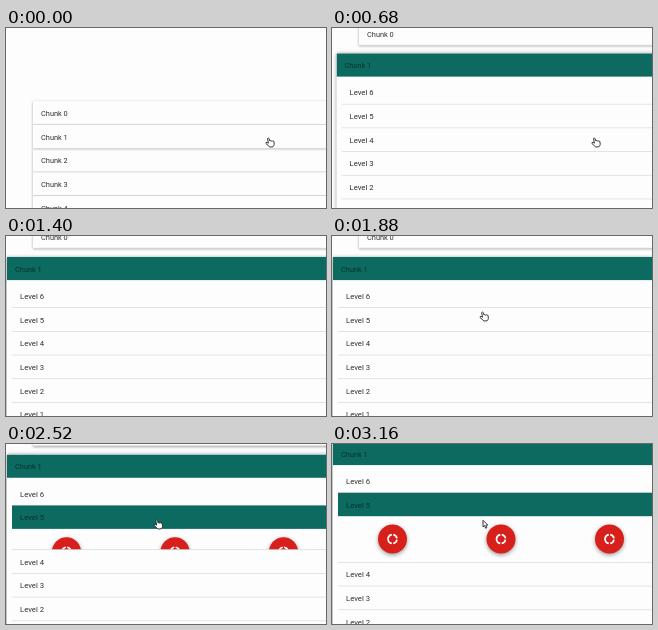
Write an HTML page with a canvas that moves like this. It is 320 px wide and 180 px high and loops after 3.2 s.

```html
<!DOCTYPE html>
<html lang="en">
<head>
<meta charset="utf-8">
<title>Expanding list</title>
<style>
html, body { margin: 0; width: 100%; height: 100%; overflow: hidden; background: #fdfdfd; }
canvas { display: block; width: 320px; height: 180px; }
</style>
</head>
<body>
<canvas id="stage"></canvas>
<script>
const LOOP = 3200, ROW = 23.7, PAPER = '#fdfdfd', TEAL = '#0c6a60', RED = '#d71f1b';
const canvas = document.getElementById('stage');
const ctx = canvas.getContext('2d');
const dpr = window.devicePixelRatio || 1;
canvas.width = 320 * dpr;
canvas.height = 180 * dpr;

const clamp = v => Math.max(0, Math.min(1, v));
const mix = (a, b, p) => a + (b - a) * p;

function bezier(x1, y1, x2, y2) {
  const at = (a, b, u) => 3 * a * u * (1 - u) ** 2 + 3 * b * u * u * (1 - u) + u ** 3;
  return x => {
    let lo = 0, hi = 1;
    for (let i = 0; i < 24; i++) {
      const mid = (lo + hi) / 2;
      if (at(x1, x2, mid) < x) lo = mid; else hi = mid;
    }
    return at(y1, y2, (lo + hi) / 2);
  };
}
const standard = bezier(0.4, 0, 0.2, 1);
const ease = bezier(0.25, 0.1, 0.25, 1);
const span = (t, start, length, curve) => curve(clamp((t - start) / length));

function rect(x, y, w, h, fill) {
  ctx.fillStyle = fill;
  ctx.fillRect(x, y, w, h);
}

function shadow(alpha, blur, dy) {
  ctx.shadowColor = `rgba(0,0,0,${alpha})`;
  ctx.shadowBlur = blur * dpr;
  ctx.shadowOffsetY = dy * dpr;
}

function card(x, y, h, alpha = 0.36, blur = 2.5) {
  ctx.save();
  shadow(alpha, blur, 0.8);
  rect(x, y, 360, h, PAPER);
  ctx.restore();
}

function label(text, x, y, size, color = '#303030') {
  ctx.font = `${size}px Roboto, sans-serif`;
  ctx.textBaseline = 'alphabetic';
  ctx.fillStyle = color;
  ctx.fillText(text, x, y + size * 0.355);
}

function chunk(i, y) {
  card(27, y, ROW);
  rect(27, y + ROW - 0.5, 293, 0.6, '#cfcfcf');
  label('Chunk ' + i, 35, y + 12.3, 7.4);
}

function ring(x, y) {
  ctx.strokeStyle = '#fff';
  ctx.lineWidth = 1.7;
  const gap = 0.16, q = Math.PI / 2;
  for (const [from, to] of [[-q, 0], [0, q], [q, 3 * q]]) {
    ctx.beginPath();
    ctx.arc(x, y, 4.5, from + gap, to - gap);
    ctx.stroke();
  }
}

function button(x, y) {
  ctx.save();
  shadow(0.4, 4, 1.5);
  ctx.fillStyle = RED;
  ctx.beginPath();
  ctx.arc(x, y, 14.5, 0, Math.PI * 2);
  ctx.fill();
  ctx.restore();
  ring(x, y);
}

function levels(x, top, drawer, active) {
  let y = top + 27.3;
  for (let n = 6; n >= 1; n--) {
    const on = n === 5 && active;
    if (on) rect(x + 5, y, 330, ROW - 0.3, TEAL);
    label('Level ' + n, x + 13, y + 12, 7.7, on ? '#08322e' : '#303030');
    y += ROW;
    if (n === 5 && drawer > 0) {
      ctx.save();
      ctx.beginPath();
      ctx.rect(0, y, 320, drawer);
      ctx.clip();
      for (const cx of [60.5, 169, 277.5]) button(cx, y + 22.5);
      ctx.restore();
      y += drawer;
    }
    if (n > 1 && !(on && drawer === 0)) rect(x + 5, y - 0.5, 330, 0.7, '#d9d9d9');
  }
}

function panel(x, top, body, teal, drawer, active) {
  const h = ROW + body;
  card(x, top, h, mix(0.36, 0.5, teal), mix(2.5, 4, teal));
  ctx.save();
  ctx.beginPath();
  ctx.rect(x, top, 360, h);
  ctx.clip();
  if (body > 0) levels(x, top, drawer, active);
  ctx.globalAlpha = teal;
  rect(x, top, 360, ROW - 0.4, TEAL);
  ctx.globalAlpha = 1;
  if (teal < 1) rect(x, top + ROW - 0.5, 360, 0.6, `rgba(207,207,207,${1 - teal})`);
  label('Chunk 1', x + 8, top + 12.2, 7.4, teal > 0.5 ? '#08322e' : '#303030');
  ctx.restore();
}

function outline(path, x, y) {
  ctx.save();
  ctx.translate(x, y);
  const shape = new Path2D(path);
  ctx.fillStyle = '#fff';
  ctx.strokeStyle = '#222';
  ctx.lineWidth = 0.9;
  ctx.lineJoin = 'round';
  ctx.fill(shape);
  ctx.stroke(shape);
  ctx.restore();
}

const HAND = 'M0 .6 Q.8 -.5 1.6 .6 L2.4 3 Q3.2 2.3 3.8 3 Q4.7 2.4 5.2 3.1 Q6.3 2.8 6.5 4 ' +
  'L6.7 6.4 Q6.4 8 5.4 8.8 L2.3 9 Q.8 7.6 -1.6 5.5 Q-1.8 4.1 -.4 4.4 L.9 5.2 Z';
const ARROW = 'M0 0 L0 6.6 L1.5 5.3 L2.7 8 L3.9 7.4 L2.8 4.9 L4.8 4.8 Z';

function cursor(t) {
  if (t < 920) {
    const p = clamp((t - 720) / 180) ** 2;
    outline(HAND, mix(261.5, 222, p), mix(110, 184, p));
  } else if (t >= 1420) {
    const p = span(t, 1420, 260, ease);
    const settle = span(t, 1740, 180, ease);
    const x = mix(216, 145, p) + 4.8 * settle;
    const y = mix(183, 76, p);
    if (t >= 2960) outline(ARROW, 151, 76.3);
    else outline(HAND, x, y);
  }
}

function draw(t) {
  const scroll = span(t, 379, 427, standard);
  const widen = span(t, 360, 560, ease);
  const reveal = span(t, 2379, 427, standard) * (t >= 2400);
  const shift = -23 * reveal;
  const top = mix(96.8, 20.8, scroll) + shift;
  const body = 165 * scroll + 46 * reveal;

  ctx.setTransform(dpr, 0, 0, dpr, 0, 0);
  rect(0, 0, 320, 180, PAPER);
  chunk(0, mix(73.1, -11.4, scroll) + shift);
  for (let i = 2; i < 5; i++) chunk(i, top + body + ROW * (i - 1));
  panel(mix(27, 1, widen), top, body, clamp((t - 380) / 80), 46 * reveal, t >= 2400);
  cursor(t);
}

let start;
function tick(now) {
  if (start === undefined) start = now;
  draw((now - start) % LOOP);
  requestAnimationFrame(tick);
}
draw(0);
requestAnimationFrame(tick);
</script>
</body>
</html>
```
